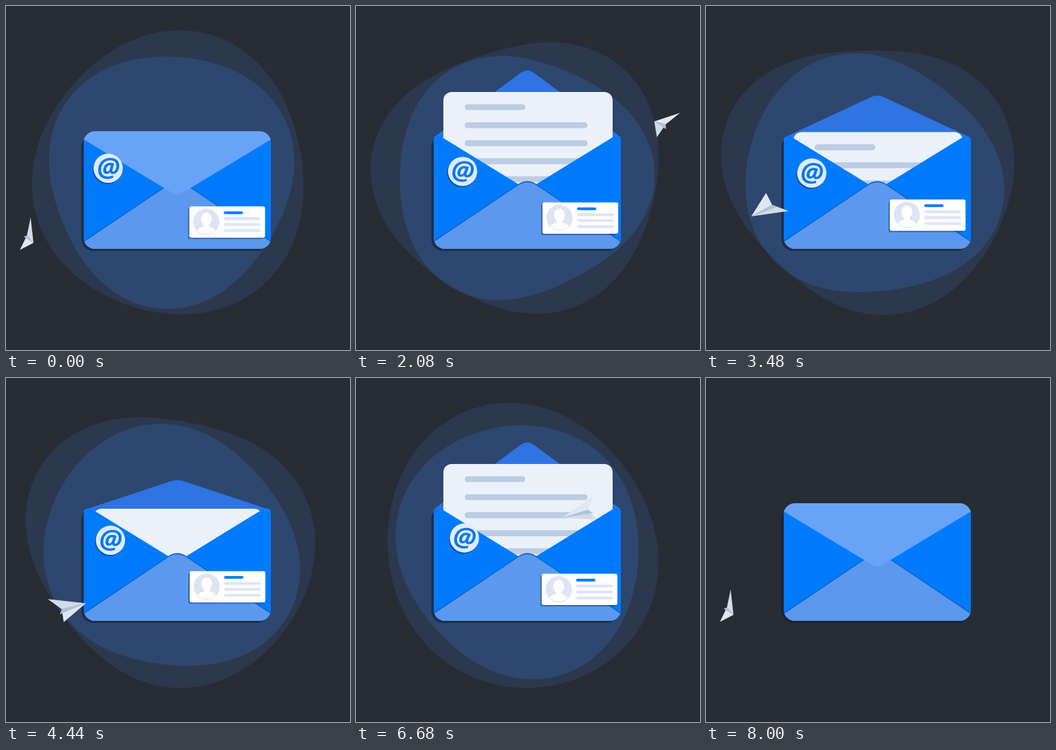
An HTML page with a canvas for the animation above (8040 ms loop, 500 by 500 pixels).

```html
<!DOCTYPE html>
<html lang="en">
<head>
<meta charset="utf-8">
<title>Mail</title>
<style>
  html, body { margin: 0; width: 100%; height: 100%; overflow: hidden; background: #282c34; }
  canvas { display: block; }
</style>
</head>
<body>
<canvas id="stage" width="500" height="500"></canvas>
<script>
const ctx = document.getElementById('stage').getContext('2d');
const LOOP = 8040, SCENE = 8000, CYCLE = 4000;
const { sin, cos, PI } = Math;
const rad = degrees => degrees * PI / 180;

const mix = (a, b, u) => a + (b - a) * u;
const ramp = (t, from, to) => Math.min(1, Math.max(0, (t - from) / (to - from)));
const ease = (t, from, to) => { const u = ramp(t, from, to); return u * u * (3 - 2 * u); };

function fill(path, color) {
  ctx.fillStyle = color;
  ctx.fill(path);
}
const shape = (d, color) => fill(new Path2D(d), color);
function box(x, y, w, h, r, color) {
  const p = new Path2D();
  p.roundRect(x, y, w, h, r);
  fill(p, color);
}
function oval(x, y, rx, ry, color) {
  const p = new Path2D();
  p.ellipse(x, y, rx, ry, 0, 0, 2 * PI);
  fill(p, color);
}

// Circle bent by waves around its rim: each wave has a resting part and a part that turns with w.
function blob(x, y, radius, waves, w, color) {
  const p = new Path2D();
  for (let a = 0; a < 2 * PI; a += PI / 90) {
    let r = radius;
    for (const { n, rest, restAt, spin, spinAt } of waves)
      r += rest * cos(n * a - rad(restAt)) + spin * cos(n * a - rad(spinAt) - w);
    p.lineTo(x + r * cos(a), y + r * sin(a));
  }
  fill(p, color);
}

function blobs(w) {
  blob(240, 246, 201.5, [
    { n: 2, rest: 4.5, restAt: 63, spin: 8, spinAt: -145 },
    { n: 3, rest: 4.2, restAt: -135, spin: 7.5, spinAt: 105 }
  ], w, 'rgba(72,140,250,.13)');
  blob(239, 249, 180, [
    { n: 2, rest: 3.4, restAt: 63, spin: 6, spinAt: -145 },
    { n: 3, rest: 2.5, restAt: -11, spin: 7.5, spinAt: -95 }
  ], w, 'rgba(58,131,240,.2)');
}

// Triangle side ending in a rounded tip, from the left base to the right base.
function tip(base, apex, round) {
  const y = mix(apex, base, round), dx = 136 * round;
  return `M113 ${base}L${249 - dx} ${y}Q249 ${apex} ${249 + dx} ${y}L385 ${base}`;
}

function letter(t) {
  const y = 190 - 65 * (ease(t, 480, 1000) - ease(t, 3000, 3600));
  box(127, y, 246, 345 - y, [12, 12, 0, 0], '#eaf1fb');
  for (let i = 0; i < 5; i++) {
    const w = (i ? 178.5 : 88) * ramp(t, 620 + 210 * i, 860 + 210 * i);
    if (w) box(158, y + 17.7 + 26.2 * i, w, 8.6, 4.3, '#bccce2');
  }
}

function envelope(t) {
  const open = ease(t, 150, 610) - ease(t, 3350, 3800);
  const base = 194 - 3 * open, apex = mix(276, 90, open);
  const up = apex < base;
  const body = new Path2D();
  body.roundRect(113, 182, 272, 171, 16);

  box(109.5, 188, 272, 168, 17, 'rgba(20,30,48,.6)');
  box(113, 191, 272, 162, [3, 3, 16, 16], '#2e74e3');
  if (up) shape(tip(base, apex, .07) + 'Z', '#2e74e3');
  letter(t);

  ctx.save();
  ctx.clip(body);
  shape('M113 353V196Q113 189 122 189L249 267L376 189Q385 189 385 196V353Z', '#007bff');
  const pocket = tip(343, 251.7, .1) + 'V354H113Z';
  ctx.translate(0, -1.7);
  shape(pocket, '#0b62c8');
  ctx.translate(0, 1.7);
  shape(pocket, '#5b98ee');
  ctx.restore();

  if (!up) {
    ctx.save();
    ctx.clip(body);
    const top = mix(194, 182, ramp(apex, 194, 276));
    shape(tip(194, apex, .04) + `V${top}H113Z`, '#68a3f6');
    ctx.restore();
  }
}

function badge(w) {
  const x = 152.5 - 7 * cos(3 * w) + 5 * cos(w - rad(53));
  const y = 237.5 + 5 * sin(w - rad(20)) + 2 * sin(3 * w);
  oval(x - 1.5, y + 2, 21.2, 21.2, 'rgba(20,60,120,.55)');
  oval(x, y, 21.2, 21.2, '#e3ebf7');
  ctx.save();
  ctx.translate(x, y);
  ctx.rotate((x - 148) * .015);
  ctx.font = 'italic 700 38px "Open Sans", sans-serif';
  ctx.textAlign = 'center';
  ctx.fillStyle = '#0878f4';
  ctx.fillText('@', 0, 12);
  ctx.restore();
}

function card(w) {
  ctx.save();
  ctx.translate(268.8 - 2.3 * cos(2 * w), 285.2 + 3.5 * cos(w) + 2.5 * cos(3 * w));
  box(-2, 2, 110, 45.5, 3, 'rgba(20,60,120,.5)');
  box(0, 0, 110, 45.5, 3, '#fff');
  oval(24.7, 22.6, 19, 19, '#dde4f4');
  oval(24.7, 18.5, 7.8, 9.5, '#fff');
  shape('M21 25H28.5V29Q36 31 38 35Q33 40 24.7 40Q16.5 40 11.5 35Q14 31 21 29Z', '#fff');
  box(50, 7.2, 28, 4, 2, '#007bff');
  for (let i = 0; i < 3; i++) box(50, 15.8 + 8.6 * i, 53.5, 4.2, 2.1, '#dfe5f5');
  ctx.restore();
}

// The plane circles an ellipse facing along it, and is seen foreshortened in the turns at both ends.
function plane(t) {
  const a = 2 * PI * (t + 60) / CYCLE, c = cos(a), s = sin(a);
  const turn = Math.atan2(30 * c - 80 * s, 208 * s);
  const half = 24.5 - 16 * c ** 6, span = 16 + 9 * c * c, skew = rad(-30 * c);
  const dx = span * sin(skew), dy = span * cos(skew);
  const nose = `${half} 0`, fold = `${-.6 * half} 0`;
  ctx.save();
  ctx.translate(241 - 208 * c, 255 + 80 * c + 30 * s);
  ctx.rotate(turn);
  shape(`M${nose}L${fold}L${-half - dx} ${dy}Z`, '#dfe7f2');
  shape(`M${nose}L${-half + dx} ${-dy}L${fold}Z`, '#d2dbe8');
  shape(`M${nose}L${fold}L${-.8 * half} ${7 * cos(turn)}Z`, '#b3c0d3');
  ctx.restore();
}

function draw(now) {
  const t = now % LOOP, phase = t % CYCLE, w = 2 * PI * t / SCENE, shown = t < SCENE;
  ctx.fillStyle = '#282c34';
  ctx.fillRect(0, 0, 500, 500);
  if (shown) blobs(w);
  envelope(phase);
  if (shown) {
    badge(w);
    card(w);
  }
  plane(phase);
}

const start = performance.now();
function tick() {
  draw(performance.now() - start);
  requestAnimationFrame(tick);
}
tick();
</script>
</body>
</html>
```
